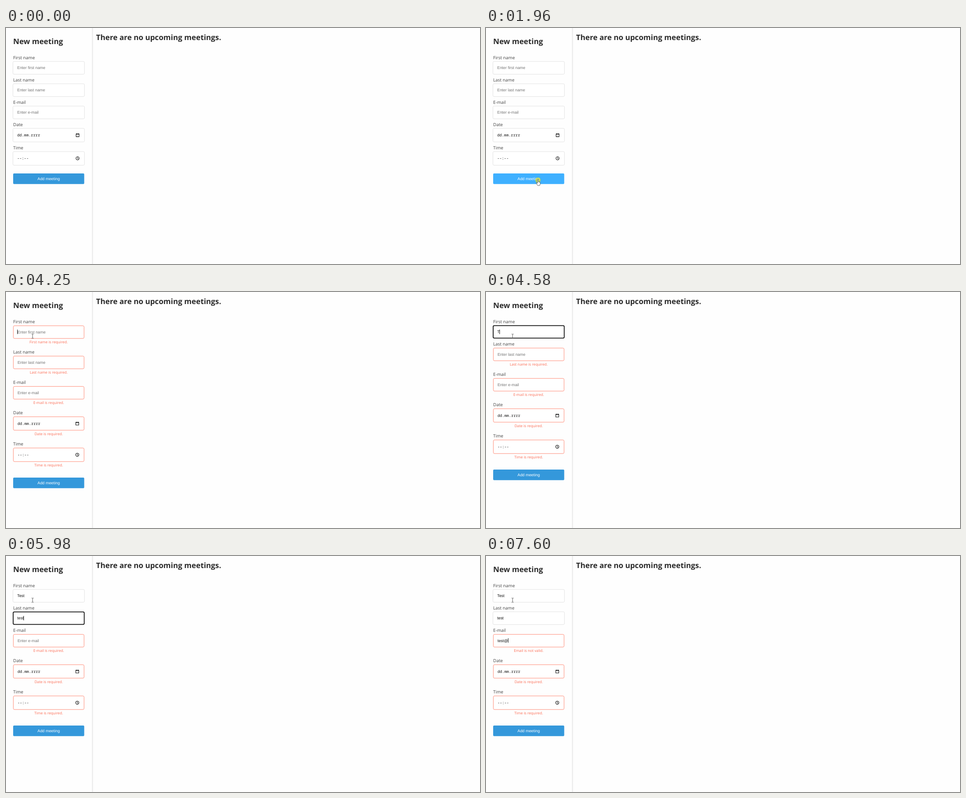
Write an HTML page that moves like this. It is 1058 by 529 pixels and loops after 8000 ms.

```html
<!DOCTYPE html>
<html lang="en">
<head>
<meta charset="utf-8">
<title>New meeting</title>
<style>
  html, body { margin: 0; width: 100%; height: 100%; overflow: hidden; background: #fefefe; }
  svg { display: block; width: 100%; height: 100%; }
  text { font-family: "Open Sans", "Noto Sans", sans-serif; text-rendering: geometricPrecision; white-space: pre; }
  .title { font-size: 16.8px; font-weight: 700; fill: #2c2c2c; }
  .label { font-size: 9.84px; fill: #444; }
  .error { font-size: 8.2px; fill: #fb6a52; text-anchor: middle; }
  .value, .action { font-family: "Liberation Sans", Arial, sans-serif; font-size: 8.889px; }
  .mono { font-family: "Noto Sans Mono", "DejaVu Sans Mono", monospace; font-size: 8.5px; fill: #111; }
  .action { fill: #fff; text-anchor: middle; }
</style>
</head>
<body>
<svg id="stage" viewBox="0 0 1058 529">
  <defs>
    <linearGradient id="edge">
      <stop offset="0" stop-color="#e2e2e2"/>
      <stop offset="1" stop-color="#fefefe"/>
    </linearGradient>
  </defs>
  <rect width="1058" height="529" fill="#fefefe"/>
  <rect x="192" width="3" height="529" fill="url(#edge)"/>
  <text class="title" x="16" y="36.2">New meeting</text>
  <text class="title" x="201" y="27">There are no upcoming meetings.</text>
  <g id="form"></g>
  <g id="button">
    <rect x="16" y="-11.8" width="158.6" height="23.7" rx="2"/>
    <text class="action" x="95.2" y="3.1">Add meeting</text>
  </g>
  <rect id="caret" width="1" height="10" fill="#111"/>
  <g id="pointer">
    <circle id="click" r="6" cy=".8" fill="#e3e01c" fill-opacity=".65"/>
    <path id="arrow" d="M0 0V9.6L2.2 7.7 3.7 11 5 10.4 3.6 7.2H6.4Z" fill="#fff" stroke="#222" stroke-width=".65"/>
    <path id="hand" d="M-1-.2a1 1 0 0 1 2 0V4.6l3 .8q1.3.4 1.2 1.6l-.5 3.4-.8 2.4H-.6L-3.6 8q-.8-1.2.4-1.5L-1 7.8Z" fill="#fff" stroke="#222" stroke-width=".7"/>
    <path id="beam" d="M-2.3-4.7H-.6L0-4.2.6-4.7H2.3M0-4.2V4.2M-2.3 4.7H-.6L0 4.2.6 4.7H2.3" fill="none" stroke="#444" stroke-width=".85"/>
  </g>
</svg>
<script>
const LOOP = 8000, FADE = 300, SUBMIT = 2090;
const $ = id => document.getElementById(id);

// errors: [from, to, message]; typed: [time, value]; focus: [from, to]
const fields = [
  { label: "First name", hint: "Enter first name", step: 50, height: 28, focus: [3250, 5370],
    errors: [[SUBMIT, 4310, "First name is required."]],
    typed: [[4310, "T"], [4770, "Te"], [4970, "Tes"], [5110, "Test"]] },
  { label: "Last name", hint: "Enter last name", step: 50, height: 28, focus: [5370, 6380],
    errors: [[SUBMIT, 5640, "Last name is required."]],
    typed: [[5640, "t"], [5770, "te"], [5850, "tes"], [5980, "test"]] },
  { label: "E-mail", hint: "Enter e-mail", step: 50, height: 28, focus: [6380, LOOP],
    errors: [[SUBMIT, 6850, "E-mail is required."], [7050, LOOP, "Email is not valid."]],
    typed: [[6850, "t"], [7050, "te"], [7180, "tes"], [7310, "test"], [7600, "test@"]] },
  { label: "Date", hint: "dd.mm.rrrr", step: 52, height: 29.7, mono: true,
    errors: [[SUBMIT, LOOP, "Date is required."]],
    icon: "M-3.3-2.8H3.3V3.5H-3.3ZM-3.3-2.1H3.3M-2-3.9V-2.8M2-3.9V-2.8" },
  { label: "Time", hint: "--:--", step: 70, height: 30, mono: true,
    errors: [[SUBMIT, LOOP, "Time is required."]],
    icon: "M-3.6 0a3.6 3.6 0 1 0 7.2 0a3.6 3.6 0 1 0-7.2 0M0-2.3V.2L1.7 1.3" }
];

const ease = p => p * p * (3 - 2 * p);
const ramp = (t, from, span = FADE) => ease(Math.min(1, Math.max(0, (t - from) / span)));
const blend = (a, b, p) => `rgb(${a.map((v, i) => Math.round(v + (b[i] - v) * p))})`;
const lastAt = (list, t) => list.filter(k => k[0] <= t).pop();
const set = (el, attrs) => { for (const k in attrs) el.setAttribute(k, attrs[k]); };
const show = (el, on) => el.setAttribute("visibility", on ? "visible" : "hidden");
const write = (el, s) => { if (el.textContent !== s) el.textContent = s; };

function add(parent, tag, attrs) {
  const el = document.createElementNS("http://www.w3.org/2000/svg", tag);
  set(el, attrs);
  return parent.appendChild(el);
}

for (const f of fields) {
  f.group = add($("form"), "g", {});
  add(f.group, "text", { class: "label", x: 16, y: 3.8 }).textContent = f.label;
  f.box = add(f.group, "rect", { rx: 2.5, fill: "#fff" });
  f.value = add(f.group, "text", { class: f.mono ? "mono" : "value" });
  f.message = add(f.group, "text", { class: "error", x: 95.2 });
  if (f.icon) f.mark = add(f.group, "path", { d: f.icon, fill: "none", stroke: "#111", "stroke-width": 1.1 });
}

// Pointer stops: [time, x, y]
const stops = [
  [230, 969, 517], [300, 780, 470], [365, 560, 415], [430, 390, 374], [495, 291, 358], [560, 298, 357]
];
for (let i = 1; i <= 12; i++) {
  const p = ease(i / 12);
  stops.push([900 + 66.4 * (i - 1), 298 - 182 * p, 357 - 16.7 * p]);
}
stops.push([2580, 116, 328], [2650, 114, 284], [2710, 111, 224], [2780, 94, 170],
  [2850, 73, 121], [2910, 61, 100], [3110, 59.4, 99]);

const caretEvents = fields.flatMap(f => f.focus ? [[f.focus[0]], ...f.typed] : [])
  .sort((a, b) => a[0] - b[0]);

const RING = [222, 222, 222], GLOW = [85, 169, 210];

function drawField(f, y, t) {
  const error = f.errors.find(e => t >= e[0] && t < e[1]);
  const focused = f.focus && t >= f.focus[0] && t < f.focus[1];
  const text = f.typed && lastAt(f.typed, t);
  const h = f.height + (error ? 1.2 : 0);
  const nudge = error ? 0.7 : 0;
  f.group.setAttribute("transform", `translate(0 ${y})`);
  f.top = y + 9.3;
  f.bottom = f.top + h;

  let x = 15.5, pad = -0.3, color = RING, width = 0.9, mix = 0, to = GLOW;
  if (error) {
    x = 16.4; pad = 0.4; width = 0.9; to = [255, 124, 102]; mix = ramp(t, error[0]);
  } else if (focused) {
    x = 16; pad = 0; width = 1.8; color = [16, 16, 16];
  } else if (f.focus && t >= f.focus[1]) {
    mix = 1 - ramp(t, f.focus[1]);
  }
  set(f.box, { x, y: 9.3 + pad, width: 190.6 - 2 * x, height: h - 2 * pad,
    stroke: blend(color, to, mix), "stroke-width": width });

  write(f.value, text ? text[1] : f.hint);
  set(f.value, { x: 25 + nudge, y: (f.mono ? 27.2 : 26) + nudge });
  if (!f.mono) f.value.setAttribute("fill", text ? "#111" : "#757575");
  if (f.mark) f.mark.setAttribute("transform", `translate(${159.8 - nudge} ${24.1 + nudge})`);
  write(f.message, error ? error[2] : "");
  f.message.setAttribute("y", 9.3 + h + 10.6);

  if (focused) {
    const len = text ? f.value.getComputedTextLength() : 0;
    set($("caret"), { x: Math.floor(25 + nudge + len), y: f.top + 9 });
  }
  return y + f.step + (error ? 18 : 0);
}

function drawPointer(t) {
  const stop = lastAt(stops, t);
  show($("pointer"), stop);
  if (!stop) return;
  const [, x, y] = stop;
  $("pointer").setAttribute("transform", `translate(${x} ${y})`);
  const overInput = x > 16 && x < 174.6 && fields.some(f => y > f.top && y < f.bottom);
  const overButton = t < SUBMIT && x < 174.6 && y < 350;
  const kind = overInput ? "beam" : overButton ? "hand" : "arrow";
  for (const id of ["beam", "hand", "arrow"]) $(id).setAttribute("display", id === kind ? "inline" : "none");
  const pressed = (t >= 1960 && t < SUBMIT) || (t >= 3250 && t < 3310);
  $("click").setAttribute("display", pressed ? "inline" : "none");
}

const hoverStart = stops.find(s => s[0] >= 900 && s[1] < 174.6 && s[2] < 350)[0];

function draw(t) {
  let y = 66;
  for (const f of fields) y = drawField(f, y, t);
  $("button").setAttribute("transform", `translate(0 ${y - 0.2})`);
  const hover = ramp(t, hoverStart, 200) - ramp(t, SUBMIT, 250);
  $("button").firstElementChild.setAttribute("fill", blend([52, 152, 219], [62, 176, 255], hover));
  const event = lastAt(caretEvents, t);
  show($("caret"), event && (t - event[0]) % 1000 < 530);
  drawPointer(t);
}

const start = performance.now();
function tick() {
  draw((performance.now() - start) % LOOP);
  requestAnimationFrame(tick);
}
tick();
</script>
</body>
</html>
```
